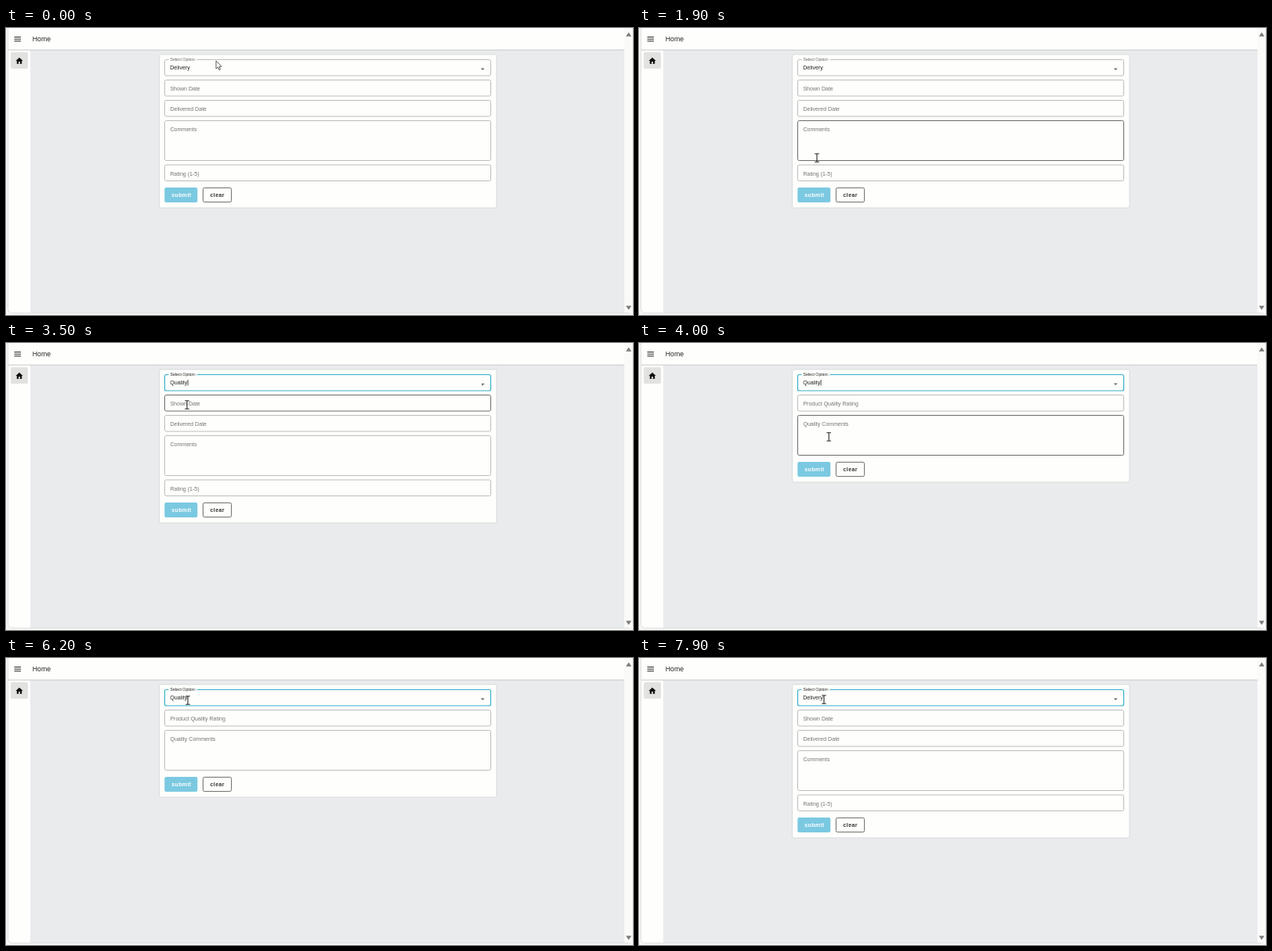
Recreate the animation shown at these times as an HTML page with a canvas. Size 800 px wide and 367 px high, loop 8 s.

```html
<!DOCTYPE html>
<html lang="en">
<head>
<meta charset="utf-8">
<title>Home</title>
<style>
html, body { margin: 0; width: 100%; height: 100%; overflow: hidden; background: #f7f7f6; }
canvas { display: block; width: 800px; height: 367px; }
</style>
</head>
<body>
<canvas id="stage"></canvas>
<script>
const W = 800, H = 367, LOOP = 8000, STEP = 100;
const FONT = '"Liberation Sans", Arial, sans-serif';
const PAPER = '#fefefc', INK = '#222', TEAL = '#35b1cb';
const LINE = '#bdbdbc', HOVER = '#6c6c6c';

// Layout: fields are stacked in one column
const LEFT = 202.5, WIDTH = 416, ROW = 20.5, TALL = 51, GAP = 5.5, TOP = 40.5;
const SELECT = { x: LEFT, y: TOP, w: WIDTH, h: ROW };
const MENU_Y = TOP + ROW + 1, OPTION_H = 19, MENU_PAD = 4;
const OPTIONS = ['Quality', 'Delivery'];

function stack(labels) {
  let y = TOP + ROW + GAP;
  const fields = labels.map(label => {
    const f = { label, x: LEFT, y, w: WIDTH, h: label.endsWith('Comments') ? TALL : ROW };
    y += f.h + GAP;
    return f;
  });
  return { fields, buttons: y + 3, bottom: y + 29 };
}

const FORMS = {
  Delivery: stack(['Shown Date', 'Delivered Date', 'Comments', 'Rating (1-5)']),
  Quality: stack(['Product Quality Rating', 'Quality Comments'])
};

// Each pick opens the menu, chooses a value and changes the form one step later
const PICKS = [
  { open: 2700, done: 3500, value: 'Quality' },
  { open: 6400, done: 7200, value: 'Delivery' }
];

// Pointer stops: time, x, y
const STOPS = [
  [0, 268, 42], [1200, 228, 194], [1900, 227, 166], [2600, 231, 54], [3500, 231, 79],
  [4200, 245, 130], [4900, 285, 81], [6200, 232, 54], [7200, 226, 92], [7900, 236, 53]
];

const canvas = document.getElementById('stage');
const ctx = canvas.getContext('2d');
const dpr = window.devicePixelRatio || 1;
canvas.width = W * dpr;
canvas.height = H * dpr;

function pointerAt(t) {
  const i = Math.max(1, STOPS.findIndex(p => p[0] >= t));
  const [t0, x0, y0] = STOPS[i - 1], [t1, x1, y1] = STOPS[i];
  const k = (t - t0) / (t1 - t0), e = k * k * (3 - 2 * k);
  return { x: x0 + (x1 - x0) * e, y: y0 + (y1 - y0) * e };
}

function inside(p, r, pad = 3) {
  return p.x > r.x + pad && p.x < r.x + r.w - pad && p.y > r.y + pad && p.y < r.y + r.h - pad;
}

function fill(x, y, w, h, color) {
  ctx.fillStyle = color;
  ctx.fillRect(x, y, w, h);
}

function box(x, y, w, h, color, line, width = 1, r = 2) {
  ctx.beginPath();
  ctx.roundRect(x, y, w, h, r);
  if (color) { ctx.fillStyle = color; ctx.fill(); }
  if (line) { ctx.strokeStyle = line; ctx.lineWidth = width; ctx.stroke(); }
}

function text(str, x, y, size, color, weight = 'normal', spacing = 0) {
  ctx.font = `${weight} ${size}px ${FONT}`;
  ctx.letterSpacing = spacing + 'px';
  ctx.fillStyle = color;
  ctx.fillText(str, x, y);
}

// Triangle with a level base; a negative height points down
function triangle(x, y, half, height, color) {
  ctx.beginPath();
  ctx.moveTo(x - half, y);
  ctx.lineTo(x + half, y);
  ctx.lineTo(x, y - height);
  ctx.fillStyle = color;
  ctx.fill();
}

function drawShell() {
  fill(0, 0, W, H, '#f7f7f6');
  box(2.5, -6, 797, 370.5, PAPER, '#dededd', 1, 5);
  fill(31, 28, 758, 336, '#e9ebed');
  fill(789, 0, 10.5, 364, '#fafaf9');
  fill(3, 27.6, 786, 1, '#c8c9ca');
  for (let i = 0; i < 3; i++) fill(10.5, 11.1 + i * 2.6, 8.5, 1, INK);
  text('Home', 33.8, 17.2, 8.7, INK);
  box(6, 31, 22, 21, '#e2e2e1');
  triangle(17, 42, 4.6, 4.2, '#111');
  fill(13.8, 41.5, 6.4, 4.3, '#111');
  fill(16.1, 43, 1.8, 2.8, '#e2e2e1');
  triangle(794.5, 10.8, 3.5, 5.3, '#7b7b7b');
  triangle(794.5, 355.2, 3.5, -5.3, '#7b7b7b');
}

function drawSelect(s) {
  const { x, y, w, h } = SELECT;
  const line = s.focus ? TEAL : s.hover === SELECT ? HOVER : LINE;
  box(x, y, w, h, null, line, s.focus ? 1.2 : 1);
  fill(207.5, 39, 36, 3, PAPER);
  text('Select Option:', 209.5, 42.1, 5.2, s.focus ? INK : '#666');
  text(s.value, 209.2, 53, 7.1, INK);
  if (s.caret) fill(209.6 + ctx.measureText(s.value).width, 47, 0.8, 7.4, INK);
  ctx.save();
  ctx.translate(608.2, 52.6);
  ctx.rotate(s.turn * Math.PI);
  triangle(0, -1.1, 2.4, -2.4, '#666');
  ctx.restore();
}

function drawForm(s) {
  const { fields, bottom, buttons } = s.form;
  box(195.5, 33.9, 430.5, bottom - 33.9, PAPER, '#d8dadb');
  for (const f of fields) {
    box(f.x, f.y, f.w, f.h, null, s.hover === f ? HOVER : LINE);
    text(f.label, 209.4, f.y + 13.6, 7.05, '#747474');
  }
  const base = buttons + 11.8;
  box(202.3, buttons, 42, 19, '#7bc9e1');
  text('submit', 211.2, base, 7, '#fff', 'bold', 0.4);
  box(251.4, buttons + 0.4, 36.2, 18.2, PAPER, HOVER);
  text('clear', 260.5, base, 7, '#333', 'bold', 0.4);
}

function drawMenu(s) {
  ctx.save();
  ctx.shadowColor = 'rgba(0,0,0,.3)';
  ctx.shadowBlur = 5;
  ctx.shadowOffsetY = 2;
  box(LEFT, MENU_Y, WIDTH, OPTIONS.length * OPTION_H + 2 * MENU_PAD, PAPER);
  ctx.restore();
  OPTIONS.forEach((name, i) => {
    const r = { x: LEFT, y: MENU_Y + MENU_PAD + i * OPTION_H, w: WIDTH, h: OPTION_H };
    if (name === s.value) fill(r.x, r.y, r.w, r.h, '#dff1f6');
    else if (inside(s.pointer, r, 0)) fill(r.x, r.y, r.w, r.h, '#f2f2f1');
    text(name, 210.8, r.y + 12, 7.1, INK);
  });
}

function drawPointer(s) {
  ctx.save();
  ctx.translate(s.pointer.x, s.pointer.y);
  if (s.hover) {
    fill(-0.5, -5, 1, 10, '#111');
    for (const y of [-5.6, 4.8]) fill(-2.8, y, 5.6, 0.9, '#111');
  } else {
    const shape = new Path2D('M0 0V10L2.3 8L3.9 11.6L5.5 10.9L4 7.4L7 7.2Z');
    ctx.fillStyle = '#fff';
    ctx.fill(shape);
    ctx.strokeStyle = '#333';
    ctx.lineWidth = 0.8;
    ctx.stroke(shape);
  }
  ctx.restore();
}

function stateAt(t) {
  const pointer = pointerAt(t);
  const valueAt = time => (PICKS.findLast(p => time >= p.done) || { value: 'Delivery' }).value;
  const form = FORMS[valueAt(t - STEP)];
  const pick = PICKS.findLast(p => t >= p.open);
  const open = !!pick && t < pick.done;
  const closing = !!pick && !open && t < pick.done + STEP;
  const blink = pick ? t - (open ? pick.open : pick.done) : 0;
  const targets = [SELECT, ...(open ? [] : form.fields)];
  return {
    pointer, form, open,
    value: valueAt(t),
    focus: !!pick,
    caret: !!pick && blink % 1060 < 530,
    turn: open ? 1 : closing ? 0.8 : 0,
    hover: targets.find(r => inside(pointer, r))
  };
}

function draw(now) {
  const s = stateAt(Math.floor((now % LOOP) / STEP) * STEP);
  ctx.setTransform(dpr, 0, 0, dpr, 0, 0);
  drawShell();
  drawForm(s);
  drawSelect(s);
  if (s.open) drawMenu(s);
  drawPointer(s);
}

const start = performance.now();
function tick() {
  draw(performance.now() - start);
  requestAnimationFrame(tick);
}
tick();
</script>
</body>
</html>
```
